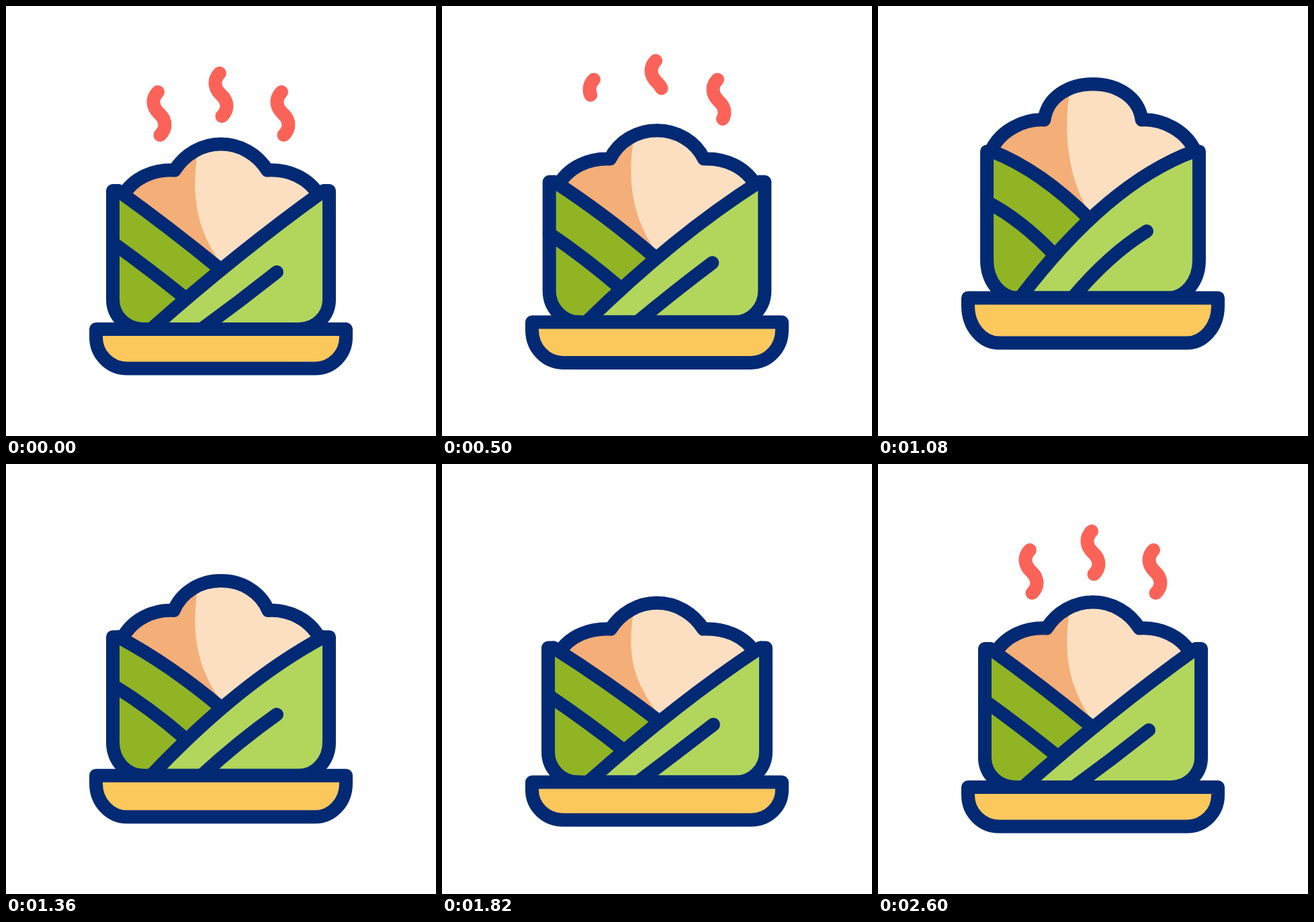
An HTML page with a canvas that plays this animation: 640x640 px, repeating every 3 s.

```html
<!DOCTYPE html>
<html>
<head>
<meta charset="utf-8">
<style>
html, body { margin: 0; overflow: hidden; background: #fff; }
canvas { display: block; }
</style>
</head>
<body>
<canvas id="stage" width="640" height="640"></canvas>
<script>
const ctx = document.getElementById('stage').getContext('2d');
const NAVY = '#022a74', CORAL = '#fc6358';
const STEAM_LENGTH = 72.8;
const steamPath = new Path2D('M318 100C309 109 309 122 320 132C331 142 331 155 321.5 164');

// time, then offsets: narrowing, dish base, dish rim, leaf corner, leaf crossing x and y, bun top, steam
const KEYS = [
  [200, 0, 0, 0, 0, 0, 0, 0, 0],
  [1200, 3.2, -39.6, -48.5, -61, -5, -78, -93, -85],
  [1470, -1.8, 0, 0, 6.5, 4.5, -2, 2.5, 0],
  [1800, -1, -10, -7.5, -1.5, 4, -9, 1.5, 0],
  [2100, 2.1, -1, -1, -4.2, -2, -10, -9.7, -11.7],
  [2360, 0, 0, 0, 0, 0, 0, 0, 0]
];

const clamp = x => Math.min(1, Math.max(0, x));
const smooth = x => x * x * (3 - 2 * x);
const sine = x => (1 - Math.cos(Math.PI * clamp(x))) / 2;

function poseAt(t) {
  let i = 0;
  while (i < KEYS.length - 2 && t > KEYS[i + 1][0]) i++;
  const a = KEYS[i], b = KEYS[i + 1];
  const e = smooth(clamp((t - a[0]) / (b[0] - a[0])));
  return a.map((v, k) => v + (b[k] - v) * e).slice(1);
}

function fill(d, color) {
  ctx.fillStyle = color;
  ctx.fill(new Path2D(d));
}

function stroke(d) {
  ctx.strokeStyle = NAVY;
  ctx.stroke(new Path2D(d));
}

// Quadratic arc between two points, its control point lifted above the middle
const bow = (x0, y0, x1, y1, lift) =>
  `M${x0} ${y0}Q${(x0 + x1) / 2} ${(y0 + y1) / 2 - lift} ${x1} ${y1}`;

function drawBun(corner, dTop, jx, jy) {
  const top = 205.5 + dTop, notch = 244.5 + 0.84 * dTop;
  const end = corner + 10, shoulder = notch + 0.22 * (end - notch);
  const sweep = notch - 0.62 * (notch - top);
  // Stretching makes the lobes rounder
  const endX = 172 + 0.09 * dTop, shoulderX = 190 + 0.14 * dTop;
  const notchX = 251 + 0.04 * dTop, sweepX = notchX + 15 + 0.12 * dTop;
  const crownX = 292 + 0.1 * dTop;
  const outline = `M${endX} ${end}C${shoulderX} ${shoulder} 222 ${notch - 1.5} ${notchX} ${notch}` +
    `C${sweepX} ${sweep} ${crownX} ${top} 320 ${top}` +
    `S${640 - sweepX} ${sweep} ${640 - notchX} ${notch}` +
    `C418 ${notch - 1.5} ${640 - shoulderX} ${shoulder} ${640 - endX} ${end}`;
  const body = `${outline}L${jx} ${jy}Z`;
  fill(body, '#fcdfc0');
  ctx.save();
  ctx.clip(new Path2D(body));
  fill(`M287 ${top}L284 ${top + 20.5}C276 ${top + 80} 285 ${jy - 60} ${jx - 2} ${jy - 12}` +
    `V${jy}H150V${top}Z`, '#f4ae78');
  ctx.restore();
  stroke(outline);
}

function drawLeaves(inset, rim, corner, jx, jy, veinY) {
  const left = 159 + inset, right = 481 - inset, foot = 216 - 1.5 * inset;
  const lip = 8, start = right - lip;
  // The front edge passes through the crossing at 0.6 of its curve
  const through = (a, j, b) => (j - 0.16 * a - 0.36 * b) / 0.48;
  const cx = through(start, jx, foot), cy = through(corner, jy, rim);
  const bend = corner + (start - cx) / (start - foot) * (rim - corner) - cy;
  const at80 = (a, c, b) => 0.04 * a + 0.32 * c + 0.64 * b;

  const ry = 45 + 0.25 * (bend - 16);
  const front = `M${start} ${corner}Q${cx} ${cy} ${foot} ${rim}`;
  const back = bow(left + lip, corner, jx, jy, 0.36 * bend);
  const leftWall = `A45 ${ry} 0 0 1 ${left} ${rim - ry}V${corner}h${lip}`;
  const rightWall = `H${right - 45}A45 ${ry} 0 0 0 ${right} ${rim - ry}V${corner}h${-lip}`;

  fill(`${back}L320 ${rim}H${left + 45}${leftWall}Z`, '#91b424');
  stroke(back);
  stroke(bow(left, 352.5 + veinY, at80(start, cx, foot), at80(corner, cy, rim), 0.22 * bend));
  fill(`${front}${rightWall}Z`, '#b2d65c');
  stroke(`${front}${rightWall}`);
  stroke(`M${left + 45} ${rim}${leftWall}`);
  stroke(bow(403 - inset, 396 + veinY, 291 - 0.5 * inset, rim, 0.35 * (bend - 16)));
}

function drawDish(rim, base) {
  const ry = base - rim - 12;
  const d = `M134 ${rim}H506V${rim + 12}A46 ${ry} 0 0 1 460 ${base}` +
    `H180A46 ${ry} 0 0 1 134 ${rim + 12}Z`;
  fill(d, '#fcc85c');
  stroke(d);
}

function drawSteam(t, dy) {
  const growing = t > 2100;
  ctx.strokeStyle = CORAL;
  for (let i = 0; i < 3; i++) {
    const part = growing ? sine((t - 2100) / 500) : 1 - sine((t - 200 - 100 * i) / 500);
    if (part < 0.001) continue;
    ctx.save();
    ctx.translate((i - 1) * 92, dy + (i === 1 ? 0 : 28));
    if (part < 1) {
      ctx.setLineDash([part * STEAM_LENGTH, 999]);
      ctx.lineDashOffset = growing ? (part - 1) * STEAM_LENGTH : 0;
    }
    ctx.stroke(steamPath);
    ctx.restore();
  }
}

function draw() {
  const t = performance.now() % 3000;
  const [inset, dBase, dRim, dCorner, dx, dy, dTop, dSteam] = poseAt(t);
  const rim = 481 + dRim, corner = 275 + dCorner;
  const jx = 320 + dx, jy = 392.5 + dy;

  ctx.fillStyle = '#fff';
  ctx.fillRect(0, 0, 640, 640);
  ctx.lineWidth = 20;
  ctx.lineCap = ctx.lineJoin = 'round';
  drawBun(corner, dTop, jx, jy);
  drawLeaves(inset, rim, corner, jx, jy, (dRim + dy) / 2);
  drawDish(rim, 539.5 + dBase);
  drawSteam(t, dSteam);
  requestAnimationFrame(draw);
}
draw();
</script>
</body>
</html>
```
